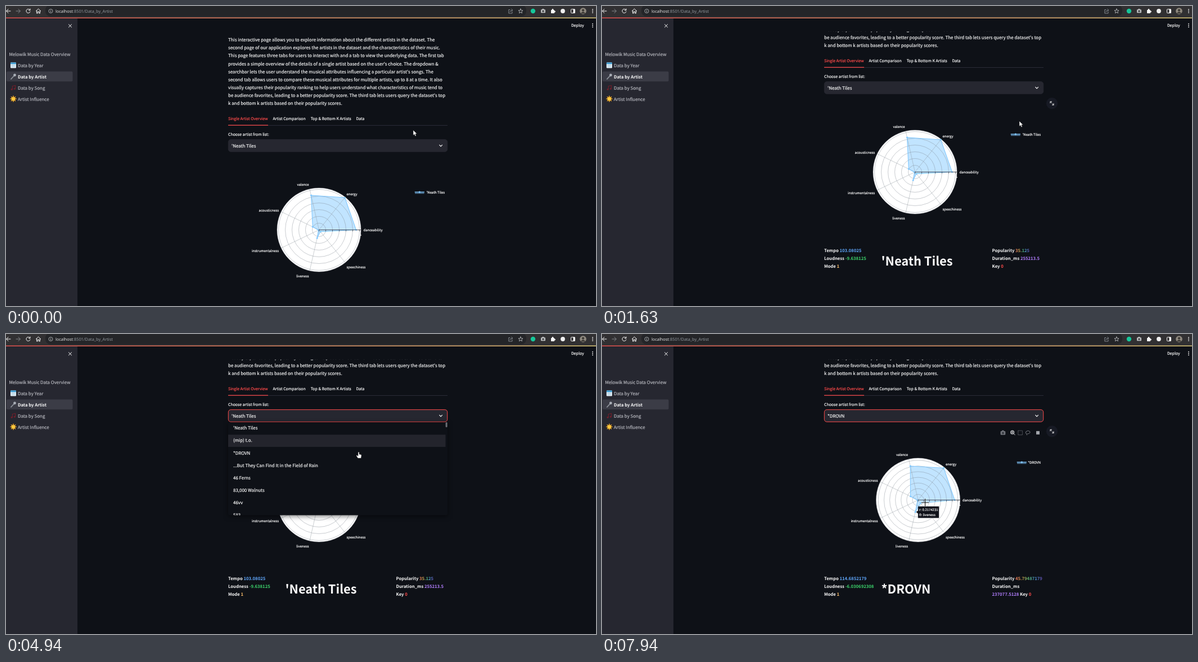
Write an HTML page that moves like this. It is 1049 px wide and 534 px high and loops after 8000 ms.

```html
<!DOCTYPE html>
<html>
<head>
<meta charset="utf-8">
<title>Data by Artist</title>
<style>
html, body { margin: 0; height: 100%; overflow: hidden; background: #0e1117; }
svg { display: block; width: 100vw; height: 100vh; }
text { font-family: "Noto Sans CJK JP", "Noto Sans CJK SC", "Noto Sans CJK", "Noto Sans", sans-serif;
  white-space: pre; text-rendering: geometricPrecision; }
.url { font-family: "Open Sans", "Noto Sans", sans-serif; font-size: 7.4px; }
.greek { font-family: "Noto Sans", sans-serif; }
.line { fill: none; stroke-linecap: round; stroke-linejoin: round; }
</style>
</head>
<body>
<svg id="stage" viewBox="0 0 1049 534" xmlns="http://www.w3.org/2000/svg"></svg>
<script>
const LOOP = 8000;
const FONT_UNIT = 0.496; // one CSS pixel of the zoomed-out page
const WHITE = '#fafafa', RED = '#ff4b4b', SKY = '#83c9ff', PANEL = '#262730', PAGE = '#0e1117';
const STRONG = { size: 15.5, weight: 600 };

// regular text gets a hairline outline so that it stays bright at small sizes
const label = (x, y, str, { size = 16, fill = WHITE, weight = 400, anchor = 'start' } = {}) =>
  `<text x="${x}" y="${y}" font-size="${size * FONT_UNIT}" fill="${fill}" font-weight="${weight}" text-anchor="${anchor}"
    ${weight === 400 ? `stroke="${fill}" stroke-width=".18"` : ''}>${str}</text>`;
const tint = (str, fill) => `<tspan fill="${fill}">${str}</tspan>`;
const rect = (x, y, w, h, fill, r = 0, more = '') =>
  `<rect x="${x}" y="${y}" width="${w}" height="${h}" rx="${r}" fill="${fill}" ${more}/>`;
const line = (d, stroke, width = 1, more = '') =>
  `<path class="line" d="${d}" stroke="${stroke}" stroke-width="${width}" ${more}/>`;
const dot = (x, y, r, fill, more = '') => `<circle cx="${x}" cy="${y}" r="${r}" fill="${fill}" ${more}/>`;
const ring = (x, y, r, stroke, width = 1) => dot(x, y, r, 'none', `stroke="${stroke}" stroke-width="${width}"`);
const menuDots = (x, y, gap) => [-gap, 0, gap].map(d => dot(x, y + d, 0.9, WHITE)).join('');

const paragraph = [
  'This interactive page allows you to explore information about the different artists in the dataset. The',
  'second page of our application explores the artists in the dataset and the characteristics of their music.',
  'This page features three tabs for users to interact with and a tab to view the underlying data. The first tab',
  "provides a simple overview of the details of a single artist based on the user's choice. The dropdown &amp;",
  "searchbar lets the user understand the musical attributes influencing a particular artist's songs. The",
  'second tab allows users to compare these musical attributes for multiple artists, up to 8 at a time. It also',
  'visually captures their popularity ranking to help users understand what characteristics of music tend to',
  "be audience favorites, leading to a better popularity score. The third tab lets users query the dataset's top",
  'k and bottom k artists based on their popularity scores.'
];

const options = ["'Neath Tiles", '(mip) t.o.', '*DROVN', '...But They Can Find It in the Field of Rain',
  '46 Ferns', '83,000 Walnuts', '46vv', '583'];

// radii are pixels from the centre, in the order of the axes
const artists = [
  { name: options[0], cx: 556.5, step: 12, radii: [66, 73.5, 63, 12.5, 1, 15, 4], legend: 727,
    tempo: '103.08025', loudness: '-9.638125', popularity: '35.125', duration: '255213.5', wrap: false },
  { name: options[2], cx: 562, step: 10.1, radii: [65, 73, 62, 15, 1, 22, 7], legend: 738,
    tempo: '114.6852179', loudness: '-6.030692308', popularity: '45.79487179', duration: '237077.5128', wrap: true }
];

const axes = [
  ['danceability', 79, 0, 'start'], ['energy', 49, -63.5, 'start'], ['valence', -18, -80.5, 'end'],
  ['acousticness', -71.5, -34.5, 'end'], ['instrumentalness', -71.5, 37.5, 'end'],
  ['liveness', -18, 82.5, 'end'], ['speechiness', 49, 66.5, 'start']
];

function chart({ name, cx, step, radii, legend }) {
  const cy = 398.5, R = 74.5;
  const polar = (r, i) => {
    const a = i * 2 * Math.PI / axes.length;
    return [cx + r * Math.cos(a), cy - r * Math.sin(a)];
  };
  const points = radii.map(polar);
  let out = dot(cx, cy, R, '#fff');
  out += line(`M${points.join('L')}Z`, 'none', 0, 'style="fill:#83c9ff;fill-opacity:.5"');
  for (let r = step; r < R; r += step) out += ring(cx, cy, r, '#777f88', 0.4);
  axes.forEach((axis, i) => { out += line(`M${cx} ${cy}L${polar(R, i)}`, '#8c939b', 0.45); });
  out += ring(cx, cy, R, '#d8dbe0', 0.5);
  out += line(`M${points.join('L')}Z`, SKY, 1.1);
  out += points.map(([x, y]) => dot(x, y, 1.6, SKY)).join('');
  out += line(`M${cx} ${cy}h${R}`, '#30353d', 0.8);
  for (let r = 0; r < R; r += step) out += line(`M${cx + r} ${cy}v2.6`, '#30353d', 0.6);
  out += rect(cx + R - 0.8, cy + 8.5, 1.4, 1.8, '#e8e8e8');
  out += axes.map(([text, dx, dy, anchor]) => label(cx + dx, cy + dy + 2.2, text, { size: 12, anchor })).join('');
  out += rect(legend, 330.8, 16.6, 3.4, '#496d8c') + line(`M${legend} 331h16.6`, SKY, 1.1) + dot(legend + 8.3, 331.2, 1.6, SKY);
  return out + label(780, 334.2, name, { size: 12, anchor: 'end' });
}

function metrics({ name, tempo, loudness, popularity, duration, wrap }) {
  const violet = tint(duration, '#b27eff'), key = 'Key ' + tint('0', RED);
  return label(395, 541, 'Tempo ' + tint(tempo, '#60a9ff'), STRONG)
    + label(395, 555, 'Loudness ' + tint(loudness, '#3dd56d'), STRONG)
    + label(395, 569, 'Mode ' + tint('1', '#ffc06b'), STRONG)
    + label(496.5, 564.8, name, { size: 44, weight: 700 })
    + label(693.5, 541, 'Popularity', STRONG)
    + label(735, 541, popularity, { ...STRONG, fill: 'url(#rainbow)' })
    + label(693.5, 555, 'Duration_ms ' + (wrap ? '' : violet), STRONG)
    + label(693.5, 569, wrap ? violet + ' ' + key : key, STRONG);
}

function browserBar() {
  const grey = '#9aa0a6';
  return rect(0, 0, 1049, 21, '#313032') + rect(70, -2, 855, 20.5, '#242528', 9)
    + rect(0, 20.5, 1049, 1.5, 'url(#edge)')
    + line('M8 9H1M4 5.5L.6 9L4 12.5', WHITE) + line('M18 9H25M22 5.5L25.4 9L22 12.5', '#85878b')
    + line('M42.3 6.6A3.6 3.6 0 1 0 43 10M43 5v2.6h-2.6', WHITE)
    + line('M53.3 9L57.5 5L61.7 9M54.6 8.5V13H56.3V10H58.7V13H60.4V8.5', WHITE)
    + ring(79.5, 9, 3.5, '#c4c7ca', 0.8) + line('M79.5 8.7V10.8M79.5 7.2v.1', '#c4c7ca', 0.8)
    + `<text class="url" x="88" y="11.7" fill="#f1f1f1">localhost${tint(':8501/Data_by_Artist', grey)}</text>`
    + line('M896 6.5H893.8V13H900V10.5M895.8 10.5Q896.5 7.5 900 7.5M898.7 5.3L901 7.5L898.7 9.6', grey, 0.8)
    + line('M915 5l1.1 2.7 2.9.2-2.2 1.9.7 2.9-2.5-1.6-2.5 1.6.7-2.9-2.2-1.9 2.9-.2z', '#c4c7ca', 0.8)
    + dot(937, 9, 4.2, '#16c79a')
    + rect(951, 6.2, 8, 6, '#b9bbbd', 1) + rect(953.2, 5, 3.4, 2, '#b9bbbd') + dot(955, 9.2, 1.8, '#4a4b4d')
    + rect(969, 7, 6, 6, WHITE, 0.8) + dot(972, 6.5, 1.4, WHITE) + dot(975.5, 10, 1.4, WHITE)
    + dot(990, 9, 3.9, '#f0f0f0')
    + rect(1004.5, 5.7, 7, 6.8, 'none', 0.8, `stroke="${WHITE}"`) + rect(1008.5, 5.7, 3, 6.8, WHITE)
    + dot(1026, 9, 5.8, '#8f897f') + dot(1026, 7.5, 2.1, '#3a3733')
    + line('M1022.6 12.8Q1026 8.4 1029.4 12.8z', '#3a3733', 1, 'style="fill:#3a3733"')
    + menuDots(1043, 9, 2.8);
}

function sidebar() {
  const soft = { fill: '#b9bac0' };
  const rays = Array.from({ length: 8 }, (_, i) => {
    const a = i * Math.PI / 4, c = Math.cos(a), s = Math.sin(a);
    return line(`M${13 + 3 * c} ${165.3 + 3 * s}L${13 + 5 * c} ${165.3 + 5 * s}`, '#f5a623', 1.5);
  }).join('');
  return rect(0, 22, 127, 512, PANEL)
    + line('M111.4 32.7l5.2 5.2m0-5.2l-5.2 5.2', WHITE)
    + rect(1, 116.5, 117.5, 17.7, '#3b3c46', 2)
    + label(5.5, 89, 'Melowik Music Data Overview', soft)
    + label(21, 109, 'Data by Year', soft)
    + label(21, 129, 'Data by Artist', STRONG)
    + label(21, 149, 'Data by Song', soft)
    + label(21, 169, 'Artist Influence', soft)
    + rect(8, 100.5, 10, 10, '#e9f2f8', 1) + rect(8, 100.5, 10, 3, '#3b9ad0', 1)
    + line('M10 105.5h6M10 108h6', '#6ea9cc', 1, 'stroke-dasharray="1 1.6"')
    + line('M9 130L14.5 124', '#8f949b', 1.8) + dot(15.5, 123, 2.4, '#a9aeb6')
    + dot(10.2, 148.4, 1.6, '#6d1f2b') + dot(15.4, 147.3, 1.6, '#6d1f2b') + line('M11.4 148V142.5L16.6 141.4V147', '#6d1f2b', 1.2)
    + rays + dot(13, 165.3, 3.4, '#ffc83d');
}

function page() {
  const tab = { size: 14 };
  const rows = options.map((o, i) => label(404, 273.3 + i * 22.17, o)).join('');
  return paragraph.map((p, i) => label(395, 63 + i * 14.18, p)).join('')
    + label(395, 203.2, 'Single Artist Overview', { size: 14, fill: RED })
    + label(474.5, 203.2, 'Artist Comparison', tab)
    + label(541.7, 203.2, 'Top &amp; Bottom K Artists', tab)
    + label(622.5, 203.2, 'Data', tab)
    + rect(395, 212, 390, 0.8, '#31333f') + rect(395, 211.6, 71, 1.2, RED)
    + label(395, 230.7, 'Choose artist from list:', tab)
    + rect(395.3, 237.7, 389.4, 21.6, PANEL, 4.4, 'id="select" stroke-width="1"')
    + artists.map((a, i) => `<g id="choice${i}">${label(401, 251.6, a.name)}</g>`).join('')
    + rect(446, 244, 0.7, 9.5, WHITE, 0, 'id="caret"')
    + line('M770.7 247.4l2.4 2.4 2.4-2.4', WHITE, 1.2)
    + artists.map((a, i) => `<g id="artist${i}">${chart(a)}${metrics(a)}</g>`).join('')
    + `<g id="menu">${rect(395, 260, 390, 165.5, PAGE, 3, 'filter="url(#shadow)"')}
       <g clip-path="url(#menuClip)">${rect(395, 0, 386.5, 21.8, '#23242c', 0, 'id="hover"')}${rows}</g>
       ${rect(781.6, 260, 3, 9, '#6c6e75', 1.5)}</g>`;
}

function overlays() {
  const grey = '#75787f';
  return `<g id="modebar">
      ${rect(708.6, 173, 8.6, 6.4, grey, 1)}${rect(711, 171.6, 3.6, 2, grey)}${dot(712.9, 176.2, 1.9, PAGE)}${dot(712.9, 176.2, 1, grey)}
      ${ring(729.6, 175, 2.9, '#d4d5d8', 1.2)}${line('M731.8 177.3l2.4 2.4M728.2 175h2.8M729.6 173.6v2.8', '#d4d5d8')}
      ${rect(739.8, 172, 7.6, 7.6, 'none', 0, `stroke="${grey}" stroke-dasharray="1.3 1"`)}
      ${line('M755 178.3Q752 176.2 754 173.6Q757.5 170.8 760.6 173.4Q762 176.8 757.8 177.6Q754.5 177 755.4 179.8', grey)}
      ${rect(772, 172.8, 6, 6, '#a2a5ab')}
    </g>
    <g id="expand">${dot(800, 173.2, 10.2, '#171a24')}
      ${line('M797 172.8v-2.6h2.6M797 170.2l2.3 2.3M803 173.6v2.6h-2.6M803 176.2l-2.3-2.3', WHITE, 0.9)}</g>
    <g id="running">${dot(918, 30.3, 1.3, '#85888f')}
      ${line('M917 32.2L915.6 35.4H919L920.6 39M913.4 33.2L916.8 32.4L919.6 33.6', '#85888f', 1.2)}
      ${line('M914 35A2.9 2.9 0 1 0 918.4 38.2', '#85888f')}
      ${label(927.5, 37.2, 'RUNNING...', { size: 14, fill: '#a3a8b4' })}
      ${label(976, 37.4, 'Stop', { size: 14 })}</g>
    ${label(1005, 37.4, 'Deploy', { size: 14 })}${menuDots(1043, 34.5, 2.9)}
    <g id="tip"><path d="M558.8 317L562 314.5V307H599V327.3H562V319.5Z" fill="#10121a" stroke="#3c4048" stroke-width=".5"/>
      ${label(564, 315.4, 'r: 0.2174231', { size: 12 })}
      ${label(564, 323.8, '<tspan class="greek">θ</tspan>: liveness', { size: 12 })}</g>`;
}

const cursors = {
  arrow: '<path d="M0 0V9.2L2.1 7.2L3.6 10.6L5.2 9.9L3.8 6.6H6.7Z" fill="#fff" stroke="#222" stroke-width=".5"/>',
  beam: line('M-2.2-4.6Q0-4.6 0-3.6Q0-4.6 2.2-4.6M0-3.6V3.6M-2.2 4.6Q0 4.6 0 3.6Q0 4.6 2.2 4.6', '#e4e4e4', 0.9),
  hand: '<path d="M-1-5Q0-6.2 1-5V-1.5L4-.9Q5.2-.4 5 1.2L4.2 5.6H-1.4L-4 1.6Q-4.4.2-3 .2L-1 1.8Z" fill="#fff" stroke="#222" stroke-width=".5"/>',
  cross: line('M-6.5 0H6.5M0-6.5V6.5', '#fff', 1.8, 'opacity=".7"') + line('M-6.5 0H6.5M0-6.5V6.5', '#111', 1.1)
};

const steps = [
  [0, { scroll: 0, kind: 'arrow', at: [724, 221], focus: 0, choice: 0, data: 0, row: 0,
        caret: false, menu: false, modebar: false, expand: false, running: false, tip: false }],
  [130, { scroll: 47.5 }],
  [400, { kind: 'beam', at: [740, 212] }],
  [780, { scroll: 72 }],
  [910, { scroll: 103 }],
  [1630, { kind: 'arrow', at: [742, 205], expand: true }],
  [1780, { at: [750, 195], modebar: true }],
  [1910, { at: [757, 186] }],
  [2050, { at: [762, 165] }],
  [2180, { kind: 'beam', at: [766, 154], modebar: false }],
  [2330, { at: [767.5, 147.5], expand: false }],
  [2620, { at: [769.5, 147] }],
  [3050, { at: [770.7, 147] }],
  [4020, { focus: 1, caret: true }],
  [4150, { focus: 2, menu: true }],
  [4550, { caret: false, kind: 'hand', at: [766, 156] }],
  [4680, { at: [757, 166] }],
  [4820, { at: [690, 192], row: 1 }],
  [4940, { at: [627, 215.5] }],
  [5070, { at: [612, 224], row: 2, caret: true }],
  [5220, { at: [577.5, 220] }],
  [5370, { at: [567, 214] }],
  [5530, { at: [564, 213.5], caret: false }],
  [5930, { menu: false, choice: 1 }],
  [6090, { kind: 'cross', at: [578, 212], modebar: true, expand: true }],
  [6230, { at: [590, 229], running: true }],
  [6360, { at: [600, 243], data: 1 }],
  [6490, { at: [621, 268] }],
  [6610, { at: [645, 292] }],
  [6760, { at: [651, 306] }],
  [6890, { at: [656, 315] }],
  [7030, { kind: 'arrow', at: [660, 345] }],
  [7160, { at: [655, 380] }],
  [7290, { at: [637, 405] }],
  [7410, { at: [612, 420], running: false }],
  [7530, { at: [590, 426], modebar: false, expand: false }],
  [7670, { at: [525, 395], expand: true }],
  [7800, { at: [536, 369], modebar: true }],
  [7940, { kind: 'cross', at: [574.5, 300], tip: true }]
];

const stops = colors => colors.map((c, i) => `<stop offset="${i / (colors.length - 1)}" stop-color="${c}"/>`).join('');

document.getElementById('stage').innerHTML = `<defs>
    <linearGradient id="rainbow">${stops(['#e8705a', '#cf9a48', '#4fb070', '#4a8fd0', '#6145a8'])}</linearGradient>
    <linearGradient id="edge">${stops(['#e2504e', '#dcc878'])}</linearGradient>
    <clipPath id="body">${rect(127, 45.5, 922, 489, '#fff')}</clipPath>
    <clipPath id="menuClip">${rect(395, 260, 390, 165.5, '#fff')}</clipPath>
    <filter id="shadow" color-interpolation-filters="sRGB"><feDropShadow dx="0" dy="2" stdDeviation="4" flood-opacity=".5"/></filter>
  </defs>
  ${rect(0, 0, 1049, 534, PAGE)}
  <g clip-path="url(#body)"><g id="page">${page()}</g></g>
  ${sidebar()}${browserBar()}${overlays()}
  <g id="cursor">${Object.entries(cursors).map(([k, shape]) => `<g id="${k}">${shape}</g>`).join('')}</g>`;

const el = id => document.getElementById(id);
const show = (id, on) => el(id).setAttribute('display', on ? 'inline' : 'none');

function render(t) {
  const s = Object.assign({}, ...steps.filter(([at]) => at <= t).map(([, change]) => change));
  el('page').setAttribute('transform', `translate(0 ${-s.scroll})`);
  el('cursor').setAttribute('transform', `translate(${s.at})`);
  el('select').setAttribute('stroke', [PANEL, '#5a2f3a', RED][s.focus]);
  el('hover').setAttribute('y', 260 + s.row * 22.17);
  for (const id of ['caret', 'menu', 'modebar', 'expand', 'running', 'tip']) show(id, s[id]);
  artists.forEach((a, i) => {
    show('choice' + i, i === s.choice);
    show('artist' + i, i === s.data);
  });
  for (const kind in cursors) show(kind, kind === s.kind);
}

function tick() {
  render(performance.now() % LOOP);
  requestAnimationFrame(tick);
}
tick();
</script>
</body>
</html>
```
